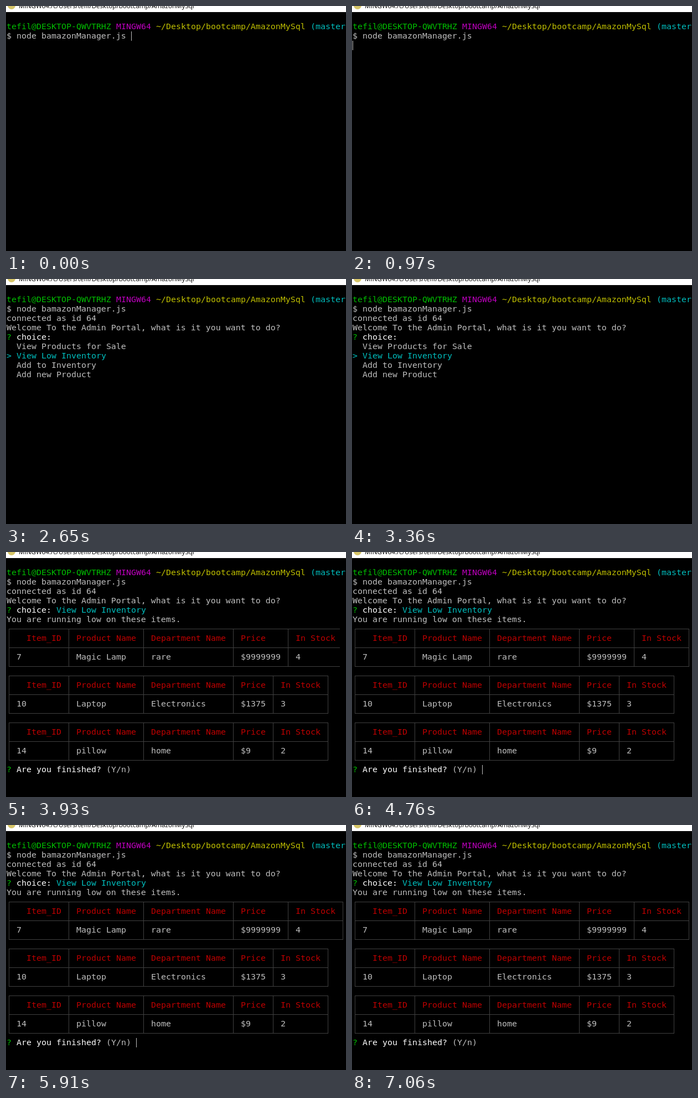
Write an HTML page with a canvas that moves like this. It is 614x444 px and loops after 7200 ms.

```html
<!DOCTYPE html>
<html lang="en">
<head>
<meta charset="utf-8">
<title>Terminal</title>
<style>
  html, body { margin: 0; width: 614px; height: 444px; overflow: hidden; background: #000; }
  canvas { display: block; }
</style>
</head>
<body>
<canvas id="stage" width="614" height="444"></canvas>
<script>
const ctx = document.getElementById("stage").getContext("2d");
const W = 614, H = 444, LOOP = 7200;
const CELL_W = 9, CELL_H = 17, LEFT = 1, TOP = 29;

const GRAY = "#bfbfbf", WHITE = "#ffffff", GREEN = "#00bf00", CYAN = "#00bfbf",
      MAGENTA = "#bf00bf", YELLOW = "#bfbf00", RED = "#bf0000", BORDER = "#404040";

// Moments of the session, in ms.
const ENTER = 100, MENU = 1520, ARROW_DOWN = 2500, RESULT = 3500, EDGE = 4760;

const MENU_ITEMS = ["View Products for Sale", "View Low Inventory", "Add to Inventory", "Add new Product"];
const HEADINGS = ["Item_ID", "Product Name", "Department Name", "Price", "In Stock"];
const TABLES = [
  { row: 6, rules: [0, 12, 27, 45, 56, 67], cells: ["7", "Magic Lamp", "rare", "$9999999", "4"] },
  { row: 11, rules: [0, 12, 27, 45, 53, 64], cells: ["10", "Laptop", "Electronics", "$1375", "3"] },
  { row: 16, rules: [0, 12, 27, 45, 53, 64], cells: ["14", "pillow", "home", "$9", "2"] }
];

// Each entry: column, row, and the spans of time when the cursor is lit.
const CURSORS = [
  { col: 25, row: 1, lit: [[0, ENTER]] },
  { col: 0, row: 2, lit: [[ENTER, 550], [970, MENU]] },
  { col: 26, row: 21, lit: [[RESULT, 3930], [4470, 5050], [5480, 6060], [6630, 7060]] }
];

const cellX = col => LEFT + col * CELL_W;
const cellY = row => TOP + row * CELL_H;

function fill(color, x, y, w, h) {
  ctx.fillStyle = color;
  ctx.fillRect(x, y, w, h);
}

function print(col, row, text, color = GRAY) {
  ctx.font = '14.95px "DejaVu Sans Mono", monospace';
  ctx.fillStyle = color;
  ctx.fillText(text, cellX(col), cellY(row) + 13);
}

function drawTitleBar() {
  fill("#ffffff", 0, 0, W, 11);
  ctx.fillStyle = "#d6c568";
  ctx.beginPath();
  ctx.arc(10, -1, 7, 0, Math.PI * 2);
  ctx.fill();
  ctx.fillStyle = "#000";
  ctx.font = '11.6px "Open Sans", sans-serif';
  ctx.fillText("MINGW64:/c/Users/tefil/Desktop/bootcamp/AmazonMySql", 23, 4);
}

function drawPrompt() {
  print(0, 0, "tefil@DESKTOP-QWVTRHZ", GREEN);
  print(22, 0, "MINGW64", MAGENTA);
  print(30, 0, "~/Desktop/bootcamp/AmazonMySql", YELLOW);
  print(61, 0, "(master", CYAN);
  print(0, 1, "$ node bamazonManager.js");
}

function drawQuestion(row, text) {
  print(0, row, "?", GREEN);
  print(2, row, text, WHITE);
}

function drawMenu(selected) {
  MENU_ITEMS.forEach((item, i) => {
    const active = i === selected;
    if (active) print(0, 5 + i, ">", CYAN);
    print(2, 5 + i, item, active ? CYAN : GRAY);
  });
}

function drawTable({ row, rules, cells }, limit) {
  const center = col => cellX(col) + 4;
  const lineY = r => cellY(r) + 8;
  const left = center(0), right = Math.min(center(rules[5]) + 1, limit);
  for (const r of [row, row + 2, row + 4]) fill(BORDER, left, lineY(r), right - left, 1);
  for (const col of rules) {
    if (center(col) < limit) fill(BORDER, center(col), lineY(row), 1, 4 * CELL_H + 1);
  }
  cells.forEach((value, i) => {
    print(rules[i] + (i ? 2 : 4), row + 1, HEADINGS[i], RED);
    print(rules[i] + 2, row + 3, value);
  });
}

function drawResult(t) {
  print(10, 4, MENU_ITEMS[1], CYAN);
  print(0, 5, "You are running low on these items.");
  const limit = t < EDGE ? 603 : W;
  TABLES.forEach(table => drawTable(table, limit));
  drawQuestion(21, "Are you finished?");
  print(20, 21, "(Y/n)");
}

function drawCursor(t) {
  for (const { col, row, lit } of CURSORS) {
    if (lit.some(([from, to]) => t >= from && t < to)) {
      fill(GRAY, cellX(col), cellY(row), 1, CELL_H);
    }
  }
}

function draw(t) {
  fill("#000", 0, 0, W, H);
  drawTitleBar();
  drawPrompt();
  if (t >= MENU) {
    print(0, 2, "connected as id 64");
    print(0, 3, "Welcome To the Admin Portal, what is it you want to do?");
    drawQuestion(4, "choice:");
    if (t < ARROW_DOWN) print(10, 4, "(Use arrow keys)");
    if (t < RESULT) drawMenu(t < ARROW_DOWN ? 0 : 1);
    else drawResult(t);
  }
  drawCursor(t);
}

const start = performance.now();
function tick() {
  draw((performance.now() - start) % LOOP);
  requestAnimationFrame(tick);
}
tick();
</script>
</body>
</html>
```
